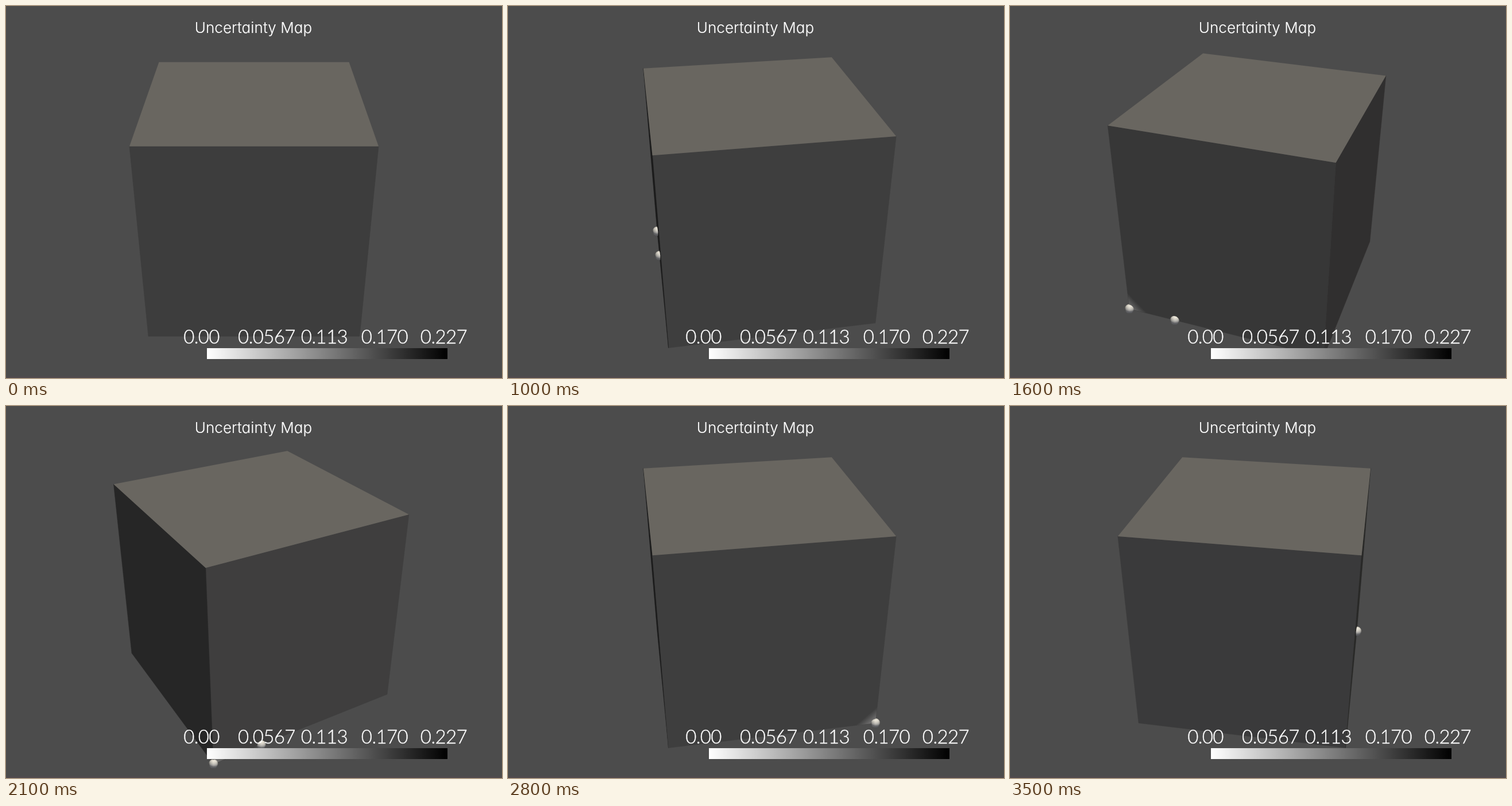
An HTML page with a canvas for the animation above (3600 ms loop, 864 by 648 pixels).

```html
<!DOCTYPE html>
<html lang="en">
<head>
<meta charset="utf-8">
<title>Uncertainty Map</title>
<style>
  html, body { margin: 0; width: 100%; height: 100%; overflow: hidden; background: #4c4c4c; }
  canvas, svg { position: absolute; left: 0; top: 0; width: 864px; height: 648px; }
  text { fill: #fff; stroke: #fff; text-anchor: middle; }
  .title { font: 300 26px Inter, "Liberation Sans", sans-serif; font-feature-settings: "cv11"; letter-spacing: 0.1px; stroke-width: 0.2px; }
  .ticks { font: 300 33px Lato, "Liberation Sans", sans-serif; letter-spacing: -0.6px; stroke-width: 0.4px; }
</style>
</head>
<body>
<canvas id="scene" width="864" height="648"></canvas>
<svg viewBox="0 0 864 648">
  <defs>
    <linearGradient id="ramp"><stop stop-color="#fff"/><stop offset="1" stop-color="#000"/></linearGradient>
  </defs>
  <rect y="645" width="864" height="3" fill="#504a4d"/>
  <text class="title" x="431" y="47">Uncertainty Map</text>
  <rect x="350" y="596" width="419" height="19" fill="url(#ramp)"/>
  <g class="ticks">
    <text x="340.5" y="588">0.00</text>
    <text x="454" y="588">0.0567</text>
    <text x="554.5" y="588">0.113</text>
    <text x="659.5" y="588">0.170</text>
    <text x="762.5" y="588">0.227</text>
  </g>
</svg>
<script>
const ctx = document.getElementById('scene').getContext('2d');
const STEPS = 36, STEP_MS = 100;
const RAD = Math.PI / 180;
const DIST = 6.938, FOCAL = 324 / Math.tan(15 * RAD);
const COS = Math.cos(30 * RAD), SIN = 0.5;
const CUBE = 122, WHITE = 255, BALL_PX = 8.2, CELL = 0.2;

// Lights fixed to the camera: elevation, azimuth, strength, tint
const lights = [
  [50, 10, 0.75, [1, 0.972, 0.902]],
  [-75, 0, 0.25, [0.933, 0.945, 1]],
  [0, 0, 0.245, [1, 1, 1]],
  [0, 110, 0.18, [1, 1, 1]],
  [0, -110, 0.18, [1, 1, 1]]
].map(([el, az, power, tint]) => ({
  dir: [Math.cos(el * RAD) * Math.sin(az * RAD), Math.sin(el * RAD), Math.cos(el * RAD) * Math.cos(az * RAD)],
  tint: tint.map(c => c * power)
}));

const corner = [1, -1, -1];
const balls = [corner, [0.5, -1, -1]];
const glowTip = [1, -1 + CELL, -1];
const faces = [
  { n: [0, 0, 1], pts: [[-1, 1, 1], [1, 1, 1], [1, -1, 1], [-1, -1, 1]] },
  { n: [-1, 0, 0], pts: [[-1, 1, -1], [-1, 1, 1], [-1, -1, 1], [-1, -1, -1]] },
  { n: [0, 0, -1], pts: [[1, 1, -1], [-1, 1, -1], [-1, -1, -1], corner], glow: [1 - CELL, -1, -1] },
  { n: [1, 0, 0], pts: [[1, 1, 1], [1, 1, -1], corner, [1, -1, 1]], glow: [1, -1, -1 + CELL] },
  { n: [0, 1, 0], pts: [[-1, 1, -1], [1, 1, -1], [1, 1, 1], [-1, 1, 1]] }
];

const dot = (a, b) => a[0] * b[0] + a[1] * b[1] + a[2] * b[2];
const rgb = (c, alpha = 1) => `rgba(${c.map(Math.round).join()},${alpha})`;

function turn([x, y, z], a) {
  const c = Math.cos(a), s = Math.sin(a);
  return [x * c + z * s, y, z * c - x * s];
}
const toCamera = ([x, y, z]) => [x, y * COS - z * SIN, y * SIN + z * COS];
const fromCamera = ([x, y, z]) => [x, y * COS + z * SIN, z * COS - y * SIN];

function project(p, angle) {
  const [x, y, z] = toCamera(turn(p, angle));
  const scale = FOCAL / (DIST - z);
  return [432 + x * scale, 324 - y * scale, scale];
}

function shade(normal, base) {
  const sum = [0, 0, 0];
  for (const { dir, tint } of lights) {
    const k = Math.max(0, dot(normal, dir)) * base;
    tint.forEach((t, i) => sum[i] += t * k);
  }
  return sum;
}

// True when the straight line from p to the eye passes through the cube
function hidden(p, eye) {
  let near = 0, far = 1;
  for (let i = 0; i < 3; i++) {
    const d = eye[i] - p[i] || 1e-9;
    const a = (-1 - p[i]) / d, b = (1 - p[i]) / d;
    near = Math.max(near, Math.min(a, b));
    far = Math.min(far, Math.max(a, b));
  }
  return far > near + 1e-6;
}

function fillPath(pts, style, outline) {
  ctx.beginPath();
  pts.forEach(p => ctx.lineTo(p[0], p[1]));
  ctx.closePath();
  ctx.fillStyle = ctx.strokeStyle = style;
  ctx.fill();
  if (outline) ctx.stroke();
}

function drawGlow(side, normal, angle) {
  const [c, a, b] = [corner, side, glowTip].map(p => project(p, angle));
  const ex = b[0] - a[0], ey = b[1] - a[1];
  const k = ((a[0] - c[0]) * ey - (a[1] - c[1]) * ex) / (ex * ex + ey * ey);
  const ramp = ctx.createLinearGradient(c[0], c[1], c[0] + ey * k, c[1] - ex * k);
  ramp.addColorStop(0, rgb(shade(normal, WHITE)));
  ramp.addColorStop(1, rgb(shade(normal, CUBE)));
  fillPath([c, a, b], ramp);
}

// Balls keep the same size on screen at any depth
function drawBall(center, angle, eye) {
  const [cx, cy, scale] = project(center, angle);
  const r = BALL_PX, n = 3;
  for (let y = Math.floor(cy - r); y <= cy + r; y++) {
    for (let x = Math.floor(cx - r); x <= cx + r; x++) {
      const sum = [0, 0, 0];
      let hits = 0;
      for (let i = 0; i < n * n; i++) {
        const u = (x + (i % n + 0.5) / n - cx) / r;
        const v = (cy - y - (Math.floor(i / n) + 0.5) / n) / r;
        const w2 = 1 - u * u - v * v;
        if (w2 < 0) continue;
        const normal = [u, v, Math.sqrt(w2)];
        const out = turn(fromCamera(normal), -angle);
        if (hidden(center.map((c, j) => c + out[j] * r / scale), eye)) continue;
        shade(normal, WHITE).forEach((c, j) => sum[j] += c);
        hits++;
      }
      if (!hits) continue;
      ctx.fillStyle = rgb(sum.map(c => c / hits), hits / (n * n));
      ctx.fillRect(x, y, 1, 1);
    }
  }
}

function draw(step) {
  const angle = step * 360 / STEPS * RAD;
  const eye = turn([0, DIST * SIN, DIST * COS], -angle);
  ctx.fillStyle = '#4c4c4c';
  ctx.fillRect(0, 0, 864, 648);
  ctx.lineWidth = 0.5;
  for (const { n, pts, glow } of faces) {
    if (dot(n, eye) <= 1) continue;
    const normal = toCamera(turn(n, angle));
    fillPath(pts.map(p => project(p, angle)), rgb(shade(normal, CUBE)), n[1] === 0);
    if (glow) drawGlow(glow, normal, angle);
  }
  balls.forEach(b => drawBall(b, angle, eye));
}

const start = performance.now();
let shown = -1;
function tick() {
  const step = Math.floor((performance.now() - start) / STEP_MS) % STEPS;
  if (step !== shown) draw(shown = step);
  requestAnimationFrame(tick);
}
tick();
</script>
</body>
</html>
```
